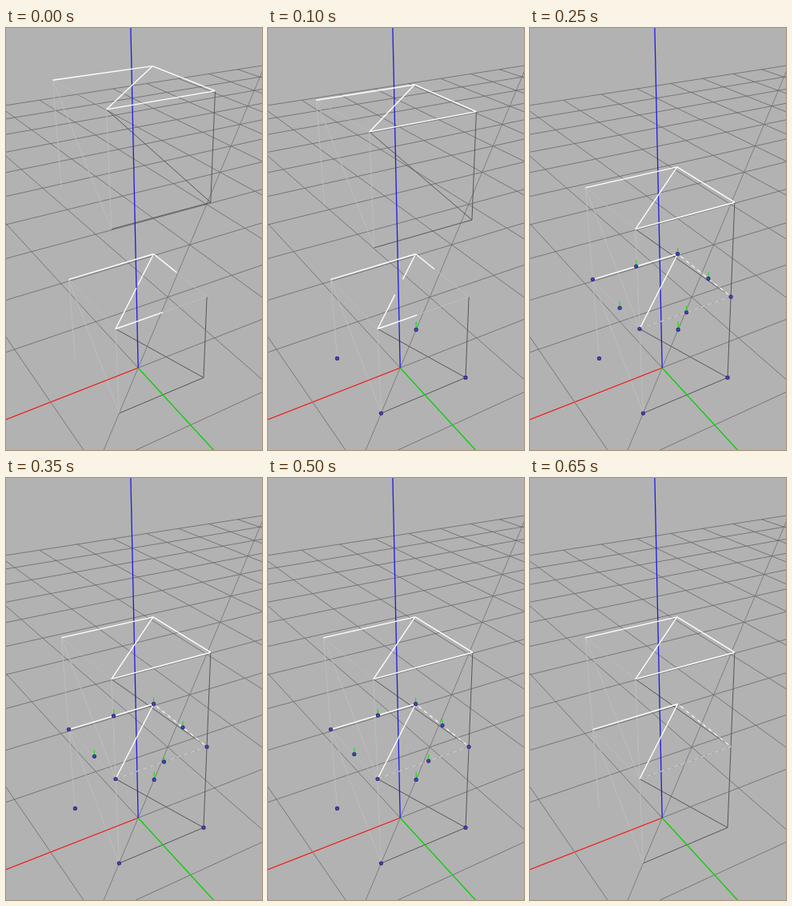
These frames come from a looping animation (320 px wide and 528 px high, 0.7 s). An HTML page with a canvas:

```html
<!DOCTYPE html>
<html lang="en">
<head>
<meta charset="utf-8">
<title>Falling box</title>
<style>
  html, body { margin: 0; height: 100%; overflow: hidden; background: #b2b2b2; }
  canvas { display: block; width: 320px; height: 528px; }
</style>
</head>
<body>
<canvas id="stage" width="320" height="528"></canvas>
<script>
const ctx = document.getElementById('stage').getContext('2d');
const LOOP = 700, STEP = 50;
const DARK = '#565656', FAINT = '#bfbfbf', WHITE = '#fff';

// Camera matrix rows: x, y, z, offset
const U = [-113.2, 41, -13.65, 165.2];
const V = [10.98, 18.78, -122.86, 425.2];
const W = [-0.0681, -0.1061, -0.0703, 1];

const row = (r, [x, y, z]) => r[0] * x + r[1] * y + r[2] * z + r[3];
const project = p => [row(U, p) / row(W, p), row(V, p) / row(W, p)];

function line(p, q, color, width = 1, dash = []) {
  ctx.strokeStyle = color;
  ctx.lineWidth = width;
  ctx.setLineDash(dash);
  ctx.beginPath();
  ctx.moveTo(...project(p));
  ctx.lineTo(...project(q));
  ctx.stroke();
}

function ground() {
  const near = 0.15;
  for (let c = -10; c <= 10; c++) {
    const yMax = Math.min(10, (1 - near + W[0] * c) / -W[1]);
    const xMax = Math.min(10, (1 - near + W[1] * c) / -W[0]);
    if (yMax > -10) line([c, -10, 0], [c, yMax, 0], '#676767', 0.8);
    if (xMax > -10) line([-10, c, 0], [xMax, c, 0], '#676767', 0.8);
  }
  line([-10, -10, 0], [3, 3, 0], '#707070', 0.8);
}

function axes() {
  line([0, 0, 0], [4, 0, 0], '#d9a0a0', 2);
  line([0, 0, 0], [4, 0, 0], '#d42020', 1.2);
  line([0, 0, 0], [0, 3, 0], '#12d012', 1.4);
  line([0, 0, 0], [0, 0, 5], '#1c1ce0', 1.3);
}

const corners = z => [[.5, -.5, z], [-.5, -.5, z], [-.5, .5, z], [.5, .5, z]];

function sides(z, bottomColor) {
  const [a, , c, d] = corners(z + 1);
  const [a0, , c0, d0] = corners(z);
  line(a, a0, FAINT, 0.9);
  line(d, d0, FAINT, 0.9);
  line(a, d0, FAINT, 0.9);
  line(a, d, FAINT, 0.7);
  line(c, c0, DARK);
  line(d, c0, DARK);
  line(d0, c0, bottomColor);
}

function litTop(z) {
  const [a, b, c, d] = corners(z);
  for (const [p, q] of [[a, b], [b, c], [c, d], [d, b]]) line(p, q, WHITE, 1.4);
}

// Top of the lower box, shaded by the box hovering `gap` above it
function shadedTop(gap) {
  const [a, b, c, d] = corners(1);
  line(a, b, WHITE, 1.4);
  if (!gap) {
    line(d, b, WHITE, 1.4);
    line(b, c, WHITE, 1.3);
    line(b, c, '#777', 0.8, [5, 4]);
    line(d, c, '#999', 0.9);
    line(d, c, '#cfcfcf', 1, [6, 3]);
    return;
  }
  const sx = 0.5 - 0.5 * gap, sy = -0.5 + 0.46 * gap;
  line(b, [-.5, sy, 1], WHITE, 1.4);
  line([-.5, sy, 1], c, FAINT, 0.9);
  line(d, [sx, .5, 1], WHITE, 1.4);
  line([sx, .5, 1], c, FAINT, 0.9);
  line(b, [sy, sy, 1], WHITE, 1.4);
  line([sx, sx, 1], d, WHITE, 1.4);
}

function contact(p, tick) {
  const [x, y] = project(p);
  if (tick) {
    ctx.fillStyle = '#22dd22';
    ctx.fillRect(x - 0.6, y - tick, 1.3, tick);
  }
  ctx.fillStyle = '#303078';
  ctx.beginPath();
  ctx.arc(x, y, 2.6, 0, 7);
  ctx.fill();
  ctx.fillStyle = '#4646c4';
  ctx.beginPath();
  ctx.arc(x, y, 1.5, 0, 7);
  ctx.fill();
}

function contacts(t, landed) {
  corners(0).forEach((p, i) => contact(p, i === 1 ? 10 : 0));
  if (!landed) return;
  corners(1).forEach((p, i) => contact(p, i === 1 ? 8 : 0));
  const x = 0.006 - 0.000177 * (t - 250), y = 0.105 - 0.0003 * (t - 250);
  for (const p of [[x, -.5, 1], [-.5, y, 1], [x, .5, 1], [.5, y, 1]]) contact(p, 8);
}

// Height above the lower box: free fall until touchdown
function gapAt(t) {
  if (t < STEP) return 1;
  const s = 0.053 + 0.135 * (t / STEP - 1);
  return Math.max(0, 1 - 9.81 / 2 * s * s);
}

function draw(now) {
  const t = Math.floor(now % LOOP / STEP) * STEP;
  const gap = gapAt(t);
  ctx.fillStyle = '#b2b2b2';
  ctx.fillRect(0, 0, 320, 528);
  ground();
  sides(0, DARK);
  sides(1 + gap, gap ? DARK : FAINT);
  axes();
  shadedTop(gap);
  litTop(2 + gap);
  if (t >= 50 && t < 600) contacts(t, !gap);
}

const start = performance.now();
function frame() {
  draw(performance.now() - start);
  requestAnimationFrame(frame);
}
frame();
</script>
</body>
</html>
```
